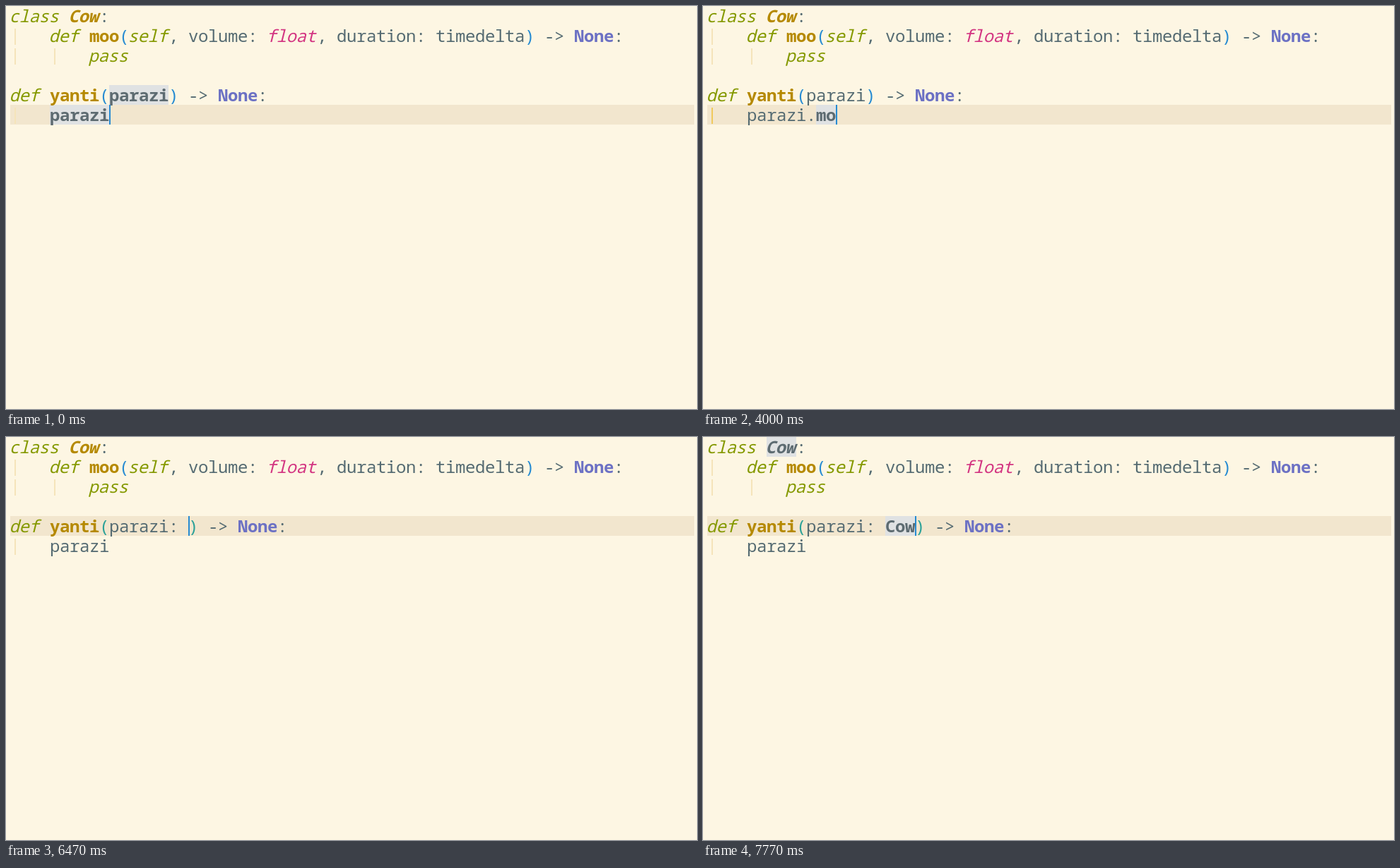
These frames come from a looping animation (978 by 571 pixels, 8 s). An HTML page:

```html
<!DOCTYPE html>
<html lang="en">
<head>
<meta charset="utf-8">
<title>Python editor</title>
<style>
  html, body { margin: 0; width: 100%; height: 100%; overflow: hidden; background: #fdf6e3; }
  svg { display: block; width: 978px; height: 571px; }
  text {
    font: 24px "Noto Sans Mono", "DejaVu Sans Mono", monospace;
    letter-spacing: -0.4px; font-variant-ligatures: none; white-space: pre;
  }
  .b { font-weight: 700; }
  /* the slant leans right of the cell, so pull it back to the middle */
  .i { font-style: italic; transform: translateX(-1.5px); }
</style>
</head>
<body>
<svg id="stage" viewBox="0 0 978 571"></svg>
<script>
const LOOP = 8000, CW = 14, LH = 28, LEFT = 6, BASE = 23;
const C = {
  bg: '#fdf6e3', bar: '#f2e6ce', mark: '#e0e2e3', guide: '#f5e4ba', active: '#f0c95c',
  text: '#556b72', bold: '#5d6b71', green: '#859900', yellow: '#b58900', pink: '#d33682',
  violet: '#6c71c4', blue: '#268bd2', cyan: '#2aa198'
};

// Each step changes part of the editor state at its time.
const steps = [
  [0, { row: 5, col: 10, on: true, arg: 'parazi', body: 'parazi', mark: 'parazi',
        paren: C.blue, guide: C.guide, popup: false }],
  [30, { on: false }],
  [570, { on: true }],
  [1000, { on: false }],
  [1530, { body: 'parazi.', col: 11, on: true, mark: '', guide: C.active }],
  [2000, { body: 'parazi.m', col: 12 }],
  [2430, { mark: 'm' }],
  [2530, { on: false }],
  [3000, { on: true }],
  [3500, { on: false }],
  [3570, { body: 'parazi.mo', col: 13, on: true, mark: '' }],
  [4000, { mark: 'mo' }],
  [4070, { on: false }],
  [4600, { body: 'parazi.m', col: 12, on: true, mark: '', guide: C.guide }],
  [4730, { body: 'parazi.', col: 11 }],
  [5070, { body: 'parazi', col: 10 }],
  [5370, { row: 4, col: 10 }],
  [5470, { col: 16 }],
  [5530, { paren: C.cyan }],
  [5600, { mark: 'parazi' }],
  [5970, { arg: 'parazi:', col: 17, mark: '' }],
  [6470, { arg: 'parazi: ', col: 18 }],
  [6700, { arg: 'parazi: C', col: 19 }],
  [6870, { arg: 'parazi: Co', col: 20 }],
  [6930, { arg: 'parazi: Cow', col: 21 }],
  [7270, { popup: true }],
  [7300, { mark: 'Cow' }],
  [7770, { popup: false }]
];

const colX = c => LEFT + c * CW;
const rect = (x, y, w, h, fill) =>
  `<rect x="${x}" y="${y}" width="${w}" height="${h}" fill="${fill}"/>`;
const cells = (row, col, n, fill) => rect(colX(col), row * LH, n * CW, LH, fill);
const guide = (row, col, fill = C.guide) => rect(colX(col) + 6, row * LH + 4, 2, 23, fill);
const esc = s => s.replace(/>/g, '&gt;');
const word = (row, col, s, fill = C.text, cls = '') =>
  `<text x="${colX(col)}" y="${row * LH + BASE}" fill="${fill}" class="${cls}">${esc(s)}</text>`;

// Lays tokens [text, colour, style] side by side.
function line(row, col, tokens) {
  let out = '';
  for (const [s, fill, cls] of tokens) {
    if (s.trim()) {
      const lead = s.length - s.trimStart().length;
      out += word(row, col + lead, s.trim(), fill, cls);
    }
    col += s.length;
  }
  return out;
}

const marked = (row, col, s) => cells(row, col, s.length, C.mark);

// Splits off a marked symbol at the end of some code.
function code(s, mark) {
  if (!mark || !s.endsWith(mark)) return [[s]];
  return [[s.slice(0, -mark.length)], [mark, C.bold, 'b']];
}

function symbolBox(row, col, s, mark) {
  return mark && s.endsWith(mark) ? marked(row, col + s.length - mark.length, mark) : '';
}

const arrow = [[' -> '], ['None', C.violet, 'b'], [':']];

function draw(s) {
  const cow = s.mark === 'Cow';
  let out = rect(0, 0, 978, 571, C.bg) + rect(LEFT, s.row * LH, 968, LH, C.bar);
  if (cow) out += marked(0, 6, 'Cow');
  out += symbolBox(4, 10, s.arg, s.mark) + symbolBox(5, 4, s.body, s.mark);

  out += guide(1, 0) + guide(2, 0) + guide(2, 4);
  if (!s.popup) out += guide(5, 0, s.guide);

  out += line(0, 0, [['class ', C.green, 'i'], ['Cow', cow ? C.bold : C.yellow, 'b i'], [':']]);
  out += line(1, 4, [
    ['def ', C.green, 'i'], ['moo', C.yellow, 'b'], ['(', C.blue], ['self', C.green, 'i'],
    [', volume: '], ['float', C.pink, 'i'], [', duration: timedelta'], [')', C.blue], ...arrow
  ]);
  out += line(2, 8, [['pass', C.green, 'i']]);
  out += line(4, 0, [
    ['def ', C.green, 'i'], ['yanti', C.yellow, 'b'], ['(', s.paren],
    ...code(s.arg, s.mark), [')', s.paren], ...arrow
  ]);
  out += line(5, 4, code(s.body, s.mark));

  if (s.on) out += rect(colX(s.col), s.row * LH, 2, LH, C.blue);
  if (s.popup) {
    out += cells(5, 32, 24, C.mark) + cells(6, 32, 24, C.bar);
    out += line(5, 33, [['Cow', C.blue, 'b'], [' global Cow (Class)', C.violet, 'b']]);
    out += line(6, 33, [['Cow', C.blue, 'b'], ['   __main__ (Class)', C.violet]]);
  }
  return out;
}

const stage = document.getElementById('stage');
const start = performance.now();
let shown = -1;

function update(t) {
  const past = steps.filter(([at]) => at <= t);
  if (past.length === shown) return;
  shown = past.length;
  stage.innerHTML = draw(Object.assign({}, ...past.map(([, change]) => change)));
}

function tick() {
  update((performance.now() - start) % LOOP);
  requestAnimationFrame(tick);
}
tick();
</script>
</body>
</html>
```
